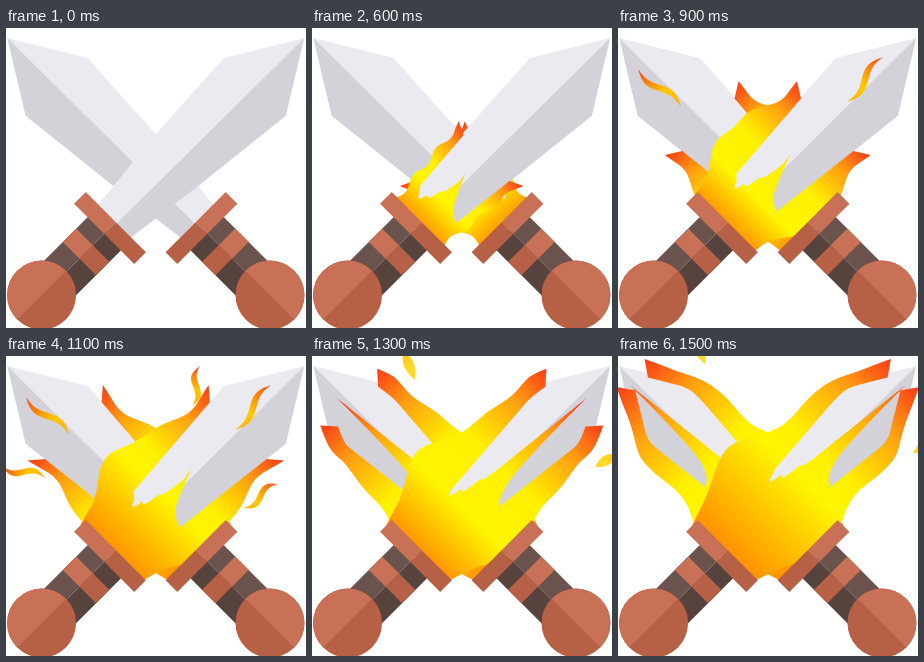
An HTML page with a canvas that plays this animation: 300x300 px, repeating every 1600 ms.

```html
<!DOCTYPE html>
<html lang="en">
<head>
<meta charset="utf-8">
<title>Flaming swords</title>
<style>
html, body { margin: 0; width: 100%; height: 100%; overflow: hidden; background: #fff; }
canvas { display: block; width: 100vw; height: 100vh; }
</style>
</head>
<body>
<canvas id="stage" width="300" height="300"></canvas>
<script>
const ctx = document.getElementById('stage').getContext('2d');
const LOOP = 1600, STEP = 100;
const STEEL = ['#ebeaf1', '#d3d2d8'];
const COPPER = ['#c87156', '#b66046'];
const GRIP = ['#6b534d', '#56433d'];
const BLADE_TIP = 271, SHOULDER = 201;

const mix = (a, b, k) => a + (b - a) * k;
const smooth = (a, b, x) => {
  const k = Math.min(1, Math.max(0, (x - a) / (b - a)));
  return k * k * (3 - 2 * k);
};
const range = (n, make) => Array.from({ length: n + 1 }, (_, i) => make(i / n));

// Swords live in a frame whose x axis runs from the guard to the blade tip
function inSwordFrame(side, draw) {
  ctx.save();
  if (side === 'left') {
    ctx.translate(299.5, 0);
    ctx.scale(-1, 1);
  }
  ctx.translate(104.5, 199.5);
  ctx.rotate(-Math.PI / 4);
  draw();
  ctx.restore();
}

function poly(fill, ...points) {
  ctx.beginPath();
  for (const [x, y] of points) ctx.lineTo(x, y);
  ctx.fillStyle = fill;
  ctx.fill();
}

function blade() {
  const tip = [BLADE_TIP, 3], root = [-8, 1.5];
  poly(STEEL[1], tip, [203, 45], [94, 33], [-1, 20.5], root, [-8, -4], [200, -8]);
  poly(STEEL[0], tip, [200, -39.6], [98, -34], [7, -24.8], root);
}

function handle() {
  const bar = (colors, from, to, half) => {
    ctx.fillStyle = colors[0];
    ctx.fillRect(from, -half, to - from, half);
    ctx.fillStyle = colors[1];
    ctx.fillRect(from, 0, to - from, half);
  };
  bar(GRIP, -80, -5, 23.5);
  bar(COPPER, -44, -25, 23.5);
  bar(COPPER, -9, 7.6, 42.5);
  for (const [fill, end] of [[COPPER[1], 3], [COPPER[0], 2]]) {
    ctx.beginPath();
    ctx.arc(-96.5, -1, 34.5, Math.PI, end * Math.PI);
    ctx.fillStyle = fill;
    ctx.fill();
  }
}

// Half-width of the blade on the upper (-1) or lower (1) side
function edge(x, side) {
  const body = side < 0 ? 24.5 + 0.076 * x : 21.5 + 0.115 * x;
  const point = 42 * (BLADE_TIP - x) / (BLADE_TIP - SHOULDER);
  return Math.max(0, Math.min(body, point));
}

// Curve that leaves its end points sharp and rounds the points between
function curve(points) {
  ctx.lineTo(...points[0]);
  const last = points.length - 1;
  for (let i = 1; i < last; i++) {
    const [x, y] = points[i], [nx, ny] = points[i + 1];
    if (i === last - 1) ctx.quadraticCurveTo(x, y, nx, ny);
    else ctx.quadraticCurveTo(x, y, (x + nx) / 2, (y + ny) / 2);
  }
  if (last === 1) ctx.lineTo(...points[1]);
}

function flame(t) {
  const k = (t - 300) / 1200;
  const flare = smooth(0.67, 0.83, k);
  const reach = 54 + 204 * k;
  const light = 18 + 20 * k + 55 * k * k;
  const dark = 25 + 100 * k * k;
  const ridge = 45 + 110 * k + 95 * flare;
  const base = Math.min(light + 60, mix(light, ridge, 0.8));
  const bulge = 32 * smooth(0.2, 0.6, k);
  const inset = 8 * flare;

  const outside = side => range(16, n => {
    const x = reach * n;
    const swell = bulge * Math.exp(-(((x - 70) / 55) ** 2));
    const ripple = 9 + 3 * Math.cos(6 * Math.PI * n);
    return [x, side * (edge(x, side) + ripple + swell * (side < 0 ? 1 : 0.9))];
  });
  const inside = (side, from, to) =>
    range(8, n => {
      const x = mix(from, to, n);
      return [x, side * Math.max(4, edge(x, side) - inset)];
    });
  const drips = range(30, n => [
    mix(light, base, n * n) - 0.14 * (base - light) * Math.abs(Math.sin(3 * Math.PI * n)),
    mix(-22, -2, n)
  ]);
  const ridgeTip = [ridge, mix(-4, 9, flare)];

  ctx.beginPath();
  curve(outside(-1));
  curve(inside(-1, reach * 0.94, light + 6));
  curve(drips);
  ctx.lineTo(...ridgeTip);
  curve([ridgeTip, [mix(dark, ridge, 0.3), 9], [dark + 2, 18], [dark, edge(dark, 1) - inset]]);
  curve(inside(1, dark, reach * 0.94));
  curve(outside(1).reverse());
  ctx.closePath();

  const flicker = Math.cos(Math.PI * (t - 1500) / 200);
  const heat = ctx.createLinearGradient(0, 0, reach, 0);
  heat.addColorStop(0, '#ff8c00');
  heat.addColorStop(0.36 + 0.07 * flicker, '#fff600');
  heat.addColorStop(0.55, '#fff000');
  heat.addColorStop(0.8, '#ffa010');
  heat.addColorStop(1, '#fb3a18');
  ctx.fillStyle = heat;
  ctx.fill();
}

const sparks = [
  { from: 800, to: 1200, tip: [20, 41], tail: [63, 79] },
  { from: 800, to: 1200, tip: [265, 29], tail: [229, 74] },
  { from: 1000, to: 1200, tip: [-4, 110], tail: [39, 122] },
  { from: 1000, to: 1200, tip: [272, 128], tail: [237, 152] },
  { from: 1000, to: 1200, tip: [194, 10], tail: [186, 50] },
  { from: 1300, to: 1500, tip: [91, -6], tail: [103, 24], drift: [-0.08, -0.08], ember: true },
  { from: 1300, to: 1500, tip: [305, 98], tail: [283, 111], drift: [0.06, -0.07], ember: true }
];

// S-shaped sliver, thickest in the middle
function spark({ from, tip, tail, drift = [0, 0], ember }, t) {
  const dx = tail[0] - tip[0], dy = tail[1] - tip[1], length = Math.hypot(dx, dy);
  const rim = side => range(16, n => {
    const off = (ember ? 0 : 4) * Math.sin(2 * Math.PI * n)
      + side * (ember ? 5 : 3.5) * Math.sin(Math.PI * n);
    return [n * length, off];
  });
  const fill = ctx.createLinearGradient(0, 0, length, 0);
  fill.addColorStop(0, ember ? '#ffc800' : '#f4471a');
  fill.addColorStop(0.6, ember ? '#ffd92a' : '#ffc800');
  fill.addColorStop(1, ember ? '#ffd92a' : '#ffb000');
  ctx.save();
  ctx.translate(tip[0] + drift[0] * (t - from), tip[1] + drift[1] * (t - from));
  ctx.rotate(Math.atan2(dy, dx));
  poly(fill, ...rim(1), ...rim(-1).reverse());
  ctx.restore();
}

function draw(t) {
  ctx.fillStyle = '#fff';
  ctx.fillRect(0, 0, 300, 300);
  for (const side of ['left', 'right']) {
    inSwordFrame(side, () => {
      blade();
      if (t >= 200) flame(t);
    });
  }
  for (const s of sparks) if (t >= s.from && t <= s.to) spark(s, t);
  inSwordFrame('left', handle);
  inSwordFrame('right', handle);
}

const start = performance.now();
function tick() {
  const t = (performance.now() - start) % LOOP;
  draw(Math.floor(t / STEP) * STEP);
  requestAnimationFrame(tick);
}
tick();
</script>
</body>
</html>
```
